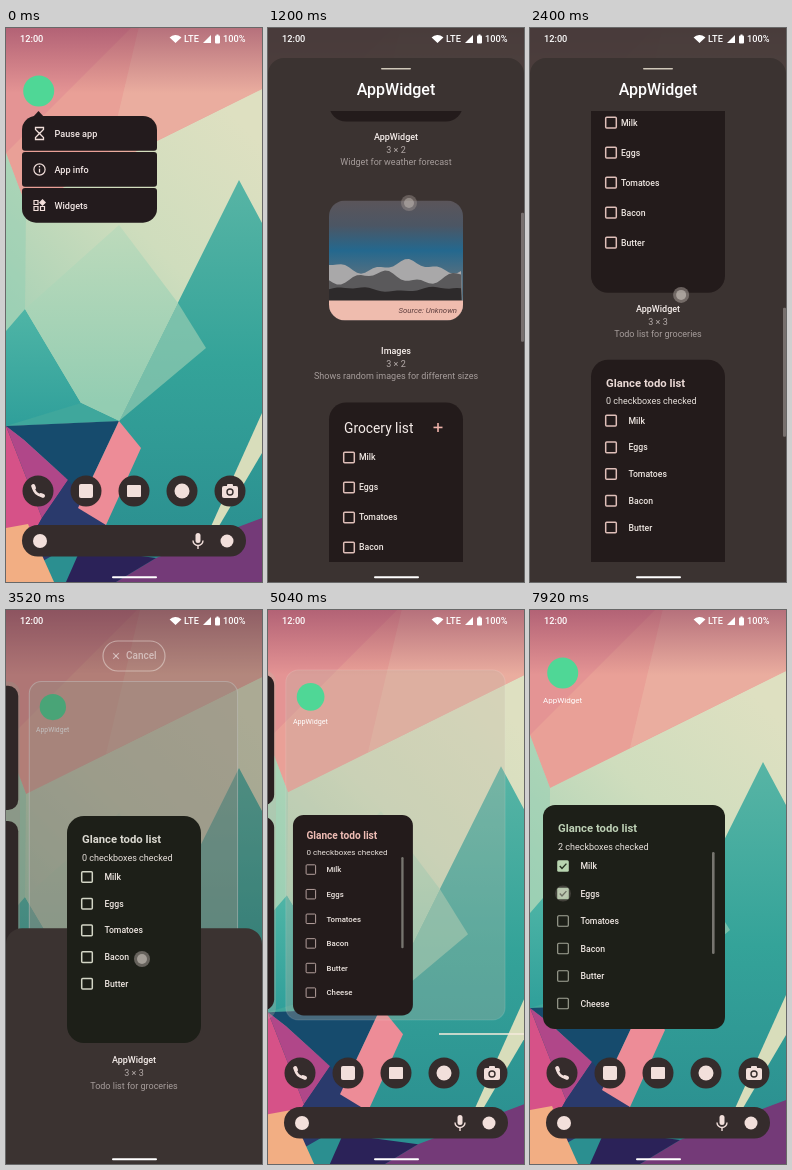
An HTML page with a canvas for the animation above (8000 ms loop, 256 px wide and 554 px high).

```html
<!DOCTYPE html>
<html lang="en">
<head>
<meta charset="utf-8">
<title>Adding a todo widget</title>
<style>
html, body { margin: 0; width: 100%; height: 100%; overflow: hidden; background: #352c2c; }
canvas { display: block; width: 256px; height: 554px; }
</style>
</head>
<body>
<canvas id="stage"></canvas>
<script>
const W = 256, H = 554, LOOP = 8000, STEP = 80;
const canvas = document.getElementById('stage');
const ratio = window.devicePixelRatio || 1;
canvas.width = W * ratio;
canvas.height = H * ratio;
const c = canvas.getContext('2d');
const DARK = '#352c2c', CREAM = '#f2dfdb';
const ITEMS = ['Milk', 'Eggs', 'Tomatoes', 'Bacon', 'Butter', 'Cheese'];
const BROWN = { bg: '#231b1b', title: '#efbdb5', box: '#b5a19e' };
const LISTED = { bg: '#231b1b', title: '#ead9d5', box: '#dfbfb9' };
const LIFTED = { bg: '#1d1f18', title: '#dcdad2', box: '#d3d5c5' };
const GREEN = { bg: '#1d1f18', title: '#bdd0b5', box: '#a4a698', check: '#b8d5b0' };

const clamp = v => Math.max(0, Math.min(1, v));
const mix = (a, b, p) => a + (b - a) * p;
const ramp = (t, a, b) => clamp((t - a) / (b - a));
const ease = (t, a, b) => { const p = ramp(t, a, b); return p * p * (3 - 2 * p); };

function layer(draw, alpha = 1) {
  c.save(); c.globalAlpha *= alpha; draw(); c.restore();
}
function rect(x, y, w, h, r, fill) {
  c.beginPath(); c.roundRect(x, y, w, h, r);
  if (fill) { c.fillStyle = fill; c.fill(); }
}
function frame(x, y, w, h, r, color, width) {
  rect(x, y, w, h, r); c.strokeStyle = color; c.lineWidth = width; c.stroke();
}
function disc(x, y, r, fill) {
  c.beginPath(); c.arc(x, y, r, 0, 7); c.fillStyle = fill; c.fill();
}
function ring(x, y, r, color, width) {
  c.beginPath(); c.arc(x, y, r, 0, 7); c.strokeStyle = color; c.lineWidth = width; c.stroke();
}
function path(points) {
  c.beginPath();
  for (const [x, y] of points) c.lineTo(x, y);
}
function poly(fill, ...points) { path(points); c.fillStyle = fill; c.fill(); }
function line(color, width, ...points) {
  path(points); c.strokeStyle = color; c.lineWidth = width; c.stroke();
}
function plus(x, y, r, color, width) {
  line(color, width, [x - r, y], [x + r, y]);
  line(color, width, [x, y - r], [x, y + r]);
}
function fade(x0, y0, x1, y1, ...colors) {
  const g = c.createLinearGradient(x0, y0, x1, y1);
  colors.forEach((color, i) => g.addColorStop(i / (colors.length - 1), color));
  return g;
}
function text(s, x, y, size, color = '#fff', weight = 400, align = 'left') {
  c.font = `${weight} ${size}px Roboto, sans-serif`;
  c.textAlign = align; c.textBaseline = 'middle';
  c.fillStyle = color; c.fillText(s, x, y + .5);
}

// Shared corners of the wallpaper facets; each facet is spelled by its corner letters
const CORNER = {
  a: [0, 125], b: [20, 178], c: [256, 61], d: [233, 152], e: [172, 275], f: [200, 320],
  g: [75, 375], h: [19, 281], i: [113, 197], j: [113, 393], k: [0, 303], l: [0, 398],
  m: [135, 420], n: [100, 497], o: [72, 480], p: [256, 385], q: [256, 425], r: [180, 554],
  s: [18, 412], t: [62, 452], u: [36, 490], v: [256, 195], w: [0, -10], x: [256, -10],
  y: [256, 554], z: [0, 554], A: [135, -10], B: [100, 138]
};
const facet = (fill, letters) => poly(fill, ...[...letters].map(k => CORNER[k]));

function wallpaper(shift) {
  layer(() => {
    c.translate(0, shift);
    rect(0, -10, W, H + 10, 0, fade(230, 90, 20, 300, '#dee0c1', '#cfddbd', '#a9d2b6'));
    facet('#e9a097', 'wxcba');
    facet('rgba(236,182,166,.6)', 'AxcB');
    facet('rgba(214,120,140,.3)', 'wAa');
    facet('rgba(140,205,178,.45)', 'abhk');
    facet(fade(0, 150, 0, 520, '#58b5a5', '#34a399', '#2b8f90'), 'dvyzj');
    facet(fade(0, 281, 0, 400, '#4fb5a6', '#2f9f9a'), 'hgjlk');
    facet(fade(0, 197, 0, 375, '#bddabb', '#93cdb2'), 'iejgh');
    facet('#3fa79c', 'gjl');
    facet('rgba(175,215,185,.55)', 'efj');
    facet('#164b6d', 'ljoz');
    facet('rgba(175,180,165,.6)', 'lst');
    facet('#b04789', 'lstu');
    facet('#d65288', 'luz');
    facet('#2a3a6c', 'utnz');
    facet('#ed8c97', 'jmno');
    facet('#d8ddbb', 'pqr');
    poly('#f2ae83', [0, 500], [22, 496], [48, 554], [0, 554]);
    poly('#743a78', [256, 490], [256, 554], [110, 554], [150, 530]);
    poly('#2b2258', [75, 520], [150, 530], [110, 554], [60, 554]);
  });
  rect(0, 0, W, 65, 0, fade(0, 0, 0, 65, 'rgba(110,30,75,.42)', 'rgba(110,30,75,0)'));
}

function statusBar() {
  text('12:00', 14, 11, 9.2, '#fff', 500);
  c.beginPath(); c.moveTo(169.5, 15); c.arc(169.5, 15, 8, -2.4, -.74);
  c.fillStyle = '#fff'; c.fill();
  text('LTE', 178, 11, 9.2, '#fff', 500);
  poly('#fff', [197, 15], [205, 7], [205, 15]);
  rect(209, 7.5, 5, 8, 1, '#fff');
  rect(210.5, 6.5, 2, 2, 0, '#fff');
  text('100%', 217, 11, 9.2, '#fff', 500);
}

function dock() {
  for (let i = 0; i < 5; i++) disc(32 + 48 * i, 463, 15.5, DARK);
  layer(() => {
    c.translate(32, 463); c.lineCap = 'round';
    c.beginPath(); c.moveTo(-5, -5); c.quadraticCurveTo(-4, 4, 5, 5);
    c.strokeStyle = CREAM; c.lineWidth = 2.4; c.stroke();
    line(CREAM, 4, [-4.8, -5], [-4, -3]);
    line(CREAM, 4, [3, 4], [5, 4.8]);
  });
  rect(73, 456, 14, 14, 2, CREAM);
  rect(121, 457, 14, 12, 1, CREAM);
  disc(176, 463, 7.5, CREAM);
  rect(216, 458, 16, 12, 2, CREAM);
  rect(221, 456, 6, 4, 1, CREAM);
  ring(224, 464, 3, DARK, 1.4);

  rect(16, 497, 224, 31.5, 15.7, DARK);
  disc(34, 513, 7, CREAM);
  rect(189.5, 505, 5, 10, 2.5, CREAM);
  c.beginPath(); c.arc(192, 512.5, 5, 0, Math.PI);
  c.strokeStyle = CREAM; c.lineWidth = 1.4; c.stroke();
  line(CREAM, 1.4, [192, 517], [192, 521]);
  disc(221, 513, 6.5, CREAM);
}

function checkbox(x, y, style, checked, width) {
  if (!checked) return frame(x - 5.3, y - 5.3, 10.6, 10.6, 1, style.box, width);
  rect(x - 5.8, y - 5.8, 11.6, 11.6, 1.5, style.check);
  line('#263322', 1.4, [x - 3.2, y], [x - 1, y + 2.4], [x + 3.4, y - 2.4]);
}
function checklist(x, y, gap, indent, count, style, width, checked = 0) {
  ITEMS.slice(0, count).forEach((name, i) => {
    checkbox(x, y + gap * i, style, i < checked, width);
    text(name, x + indent, y + gap * i, 8.7, '#eee6e1', 500);
  });
}

function todoCard(x, y, w, h, style, placed, checked = 0) {
  rect(x, y, w, h, placed ? 12 : 17, style.bg);
  text('Glance todo list', x + 15, y + 23, 11.3, style.title, 700);
  text(checked + ' checkboxes checked', x + 15, y + 41.5, 9, '#e8e1dc');
  if (placed) {
    checklist(x + 20, y + 61, 27.5, 17.5, 6, style, 1.1, checked);
    rect(x + w - 13, y + 47, 2.6, 102, 1.3, '#77756f');
  } else checklist(x + 20, y + 61, 26.7, 17.5, 5, style, 1.5);
}

function menu() {
  const fill = '#231b1d', outer = 14, inner = 3;
  poly(fill, [27, 89], [32.5, 83], [38, 89]);
  ['Pause app', 'App info', 'Widgets'].forEach((name, i) => {
    const top = i == 0 ? outer : inner, bottom = i == 2 ? outer : inner;
    rect(16, 88 + 36 * i, 135, 34.7, [top, top, bottom, bottom], fill);
    text(name, 48.5, 105.5 + 36 * i, 9.1, '#f4e9e7', 500);
  });
  const x = 33.5;
  for (const side of [-1, 1])
    line(CREAM, 1.3, [x, 105.5], [x - 4, 105.5 + 4 * side], [x - 4, 105.5 + 6 * side],
      [x + 4, 105.5 + 6 * side], [x + 4, 105.5 + 4 * side], [x, 105.5]);
  ring(x, 141.5, 5.6, CREAM, 1.2);
  line(CREAM, 1.3, [x, 140.7], [x, 144.5]);
  line(CREAM, 1.3, [x, 138], [x, 139.4]);
  for (const [col, row] of [[0, 0], [0, 1], [1, 1]])
    frame(28 + 6.5 * col, 172.5 + 6 * row, 4, 4, 0, CREAM, 1.2);
  poly(CREAM, [36.5, 171], [40, 174.5], [36.5, 178], [33, 174.5]);
}

function caption(y, name, size, about) {
  text(name, 128, y, 9, '#f7efec', 500, 'center');
  text(size, 128, y + 13, 9, '#b5acaa', 400, 'center');
  text(about, 128, y + 25.5, 9, '#a69d9b', 400, 'center');
}

function ridge(y, height, phase, fill) {
  const points = [[195, y + 50], [61, y + 50]];
  for (let x = 61; x <= 195; x += 4)
    points.push([x, y + height * (Math.sin(x / 14 + phase) + .5 * Math.sin(x / 5 + 2 * phase))]);
  poly(fill, ...points);
}
function photoCard(y) {
  layer(() => {
    rect(61, y, 134, 120, 16); c.clip();
    rect(61, y, 134, 100, 0, fade(0, y, 0, y + 75, '#5b555a', '#4c5664', '#24688e', '#546f80'));
    ridge(y + 66, 5, 1, '#a9a8a9');
    ridge(y + 77, 5, 3, '#5a595b');
    ridge(y + 89, 2, 5, '#2d2a2b');
    rect(61, y + 100, 134, 20, 0, '#efbcae');
  });
  text('Source: Unknown', 189, y + 110, 7.8, '#5d3d3d', 'italic 400', 'right');
}

function groceryCard(y) {
  rect(61, y, 134, 225, 17, LISTED.bg);
  text('Grocery list', 76, y + 26, 13.8, '#f5ece9');
  plus(170, y + 25, 4.5, '#efb3aa', 1.6);
  checklist(81, y + 55, 30, 10, 5, LISTED, 1.5);
}

// Flicks through the list: start time and distance scrolled
const FLICKS = [[800, 526], [1400, 104], [2150, 190]];
const scrollAt = t => FLICKS.reduce((sum, [start, d]) => sum + d * ease(t, start, start + 640), 0);

function sheet(t, top, dragging) {
  rect(0, top, W, H, [16, 16, 0, 0], '#3b3331');
  if (dragging) return layer(() => {
    rect(0, top, W, H, 0); c.clip();
    caption(450, 'AppWidget', '3 × 3', 'Todo list for groceries');
  });
  const scroll = scrollAt(t);
  layer(() => {
    c.translate(0, top - 30);
    rect(113, 40, 30, 1.6, .8, '#cfc8b9');
    text('AppWidget', 128, 62, 16, '#fff', 500, 'center');
    rect(253, 83 + scroll / 3.53, 3, 129, 1, '#77706e');
    rect(0, 83, W, 451, 0); c.clip();
    c.translate(0, -scroll);
    rect(61, 97, 134, 356, 17, LISTED.bg);
    caption(468, 'AppWidget', '3 × 2', 'Widget for weather forecast');
    photoCard(532);
    caption(682, 'Images', '3 × 2', 'Shows random images for different sizes');
    groceryCard(734);
    caption(975, 'AppWidget', '3 × 3', 'Todo list for groceries');
    todoCard(61, 1026, 134, 227, LISTED);
    caption(1270, 'AppWidget', '3 × 3', 'Todo list for groceries');
  });
}

function page(away, labelled, drawWidget) {
  const scale = 1 - .15 * away;
  layer(() => {
    c.translate(127, 290); c.scale(scale, scale); c.translate(-127, -290);
    if (away > 0) {
      for (const x of [5, -251]) rect(x, 33, 245, 391, 14, `rgba(190,180,165,${.42 * away})`);
      frame(5, 33, 245, 391, 14, `rgba(255,255,255,${.5 * away ** 4})`, 1.2);
      rect(-240, 38, 232, 146, 12, '#2a2021');
      rect(-240, 197, 232, 216, 12, '#2a2021');
    }
    disc(32.7, 63, 15.5, '#4fd796');
    if (labelled) text('AppWidget', 32.5, 90, 8, '#fff', 400, 'center');
    drawWidget();
  });
}

function resizeFrame(right) {
  const mid = (14 + right) / 2;
  frame(13.5, 195, right - 13.5, 224, 10, '#f6e5df', 1.5);
  for (const [x, y] of [[mid, 195], [mid, 419], [13, 307]]) disc(x, y, 5, 'rgba(85,75,72,.75)');
  disc(right, 307, 5.2, '#f9ebe7');
}

// A finger pressed from start to end, fading after it lifts
function finger(t, start, end, x, y) {
  if (t < start || t > end + 160) return;
  layer(() => {
    disc(x, y, 8, 'rgba(165,155,150,.6)');
    disc(x, y, 5, 'rgba(215,207,200,.6)');
  }, .9 * (1 - ramp(t, end, end + 160)));
}

function render(t) {
  const dragging = t >= 3200 && t < 4720, dropped = t >= 4720;
  const open = ease(t, 400, 700) * (1 - ease(t, 3360, 3660));
  const away = ease(t, 3200, 3480) - ease(t, 4920, 5250);
  const carry = ease(t, 3560, 4500), dragX = -31 * carry, dragY = 3 * carry;
  const edge = mix(147, 218, ease(t, 5920, 6440)) - 23 * ease(t, 6640, 6740);
  const taps = [7200, 7760];
  const checked = taps.filter(start => t >= start + 80).length;

  wallpaper(6 * away);
  page(away, t >= 480, () => {
    if (!dropped) return;
    todoCard(13, 195, edge > 171 ? 182 : 134, 224, t < 5280 ? BROWN : GREEN, true, checked);
    if (t >= 5520 && t < 6960) resizeFrame(edge);
  });
  dock();
  const indicator = ease(t, 4720, 4880) * (1 - ease(t, 5200, 5520));
  rect(171, 423.2, 85, 1.6, 0, `rgba(246,235,220,${indicator})`);
  if (t < 480) layer(menu, 1 - ease(t, 360, 480));

  if (open > 0) {
    rect(0, 0, W, H, 0, `rgba(62,55,53,${.9 * open ** 1.3})`);
    sheet(t, mix(H, 30, open), dragging);
  }
  if (dragging) {
    layer(() => {
      frame(97, 31, 62, 30, 15, '#eee5df', 1.2);
      layer(() => { c.translate(110, 46); c.rotate(Math.PI / 4); plus(0, 0, 4, '#fff', 1.2); });
      text('Cancel', 120, 46, 10, '#fff', 500);
    }, ease(t, 3360, 3680) * (1 - ease(t, 4600, 4720)));
    layer(() => {
      const size = mix(1, .85, ease(t, 4560, 4720));
      c.translate(61 + dragX, 206 + dragY); c.scale(size, size);
      todoCard(0, 0, 134, 227, LIFTED);
    });
  }

  finger(t, 320, 400, 64, 178);
  for (const [start] of FLICKS) {
    const p = ramp(t, start, start + 400);
    finger(t, start, start + 360, mix(168, 141, p), mix(420, 175, p));
  }
  finger(t, 2960, 4600, 136 + dragX, 349 + dragY);
  finger(t, 5300, 5640, 92, 310);
  finger(t, 5920, 6640, edge + 4, 325);
  taps.forEach((start, i) => finger(t, start, start + 80, 33, 256 + 27.5 * i));

  statusBar();
  rect(106, 548.3, 45, 2, 1, '#fff');
}

function tick(now) {
  const t = Math.floor(now % LOOP / STEP) * STEP;
  c.setTransform(ratio, 0, 0, ratio, 0, 0);
  render(t < 240 ? 0 : t);
  requestAnimationFrame(tick);
}
requestAnimationFrame(tick);
</script>
</body>
</html>
```
